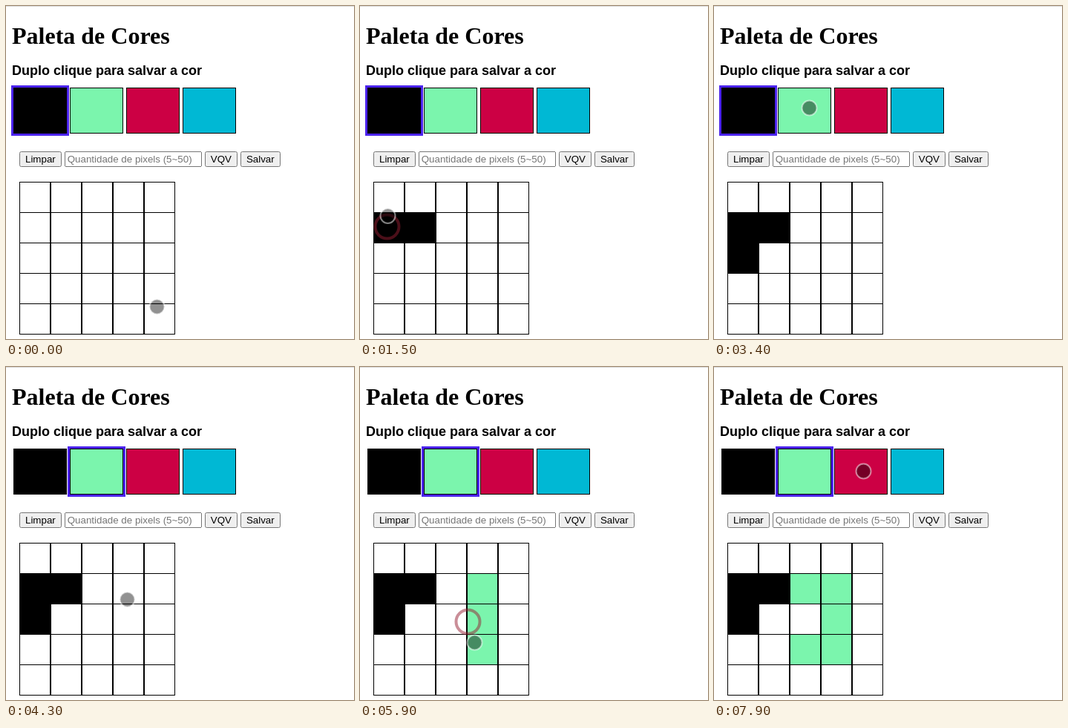
An HTML page that plays this animation: 469x449 px, repeating every 8 s.

```html
<!DOCTYPE html>
<html lang="pt">
<head>
<meta charset="utf-8">
<title>Paleta de Cores</title>
<style>
  html, body { margin: 0; width: 100%; height: 100%; overflow: hidden; background: #fff; }
  h1, h2, .controls, svg { position: absolute; margin: 0; white-space: nowrap; }
  h1 { left: 8px; top: 22px; font: bold 32px/37px "Liberation Serif", Times, serif; }
  h2 { left: 8px; top: 77px; font: bold 18px/20px "Liberation Sans", Arial, sans-serif; }
  .controls { left: 18px; top: 196px; display: flex; gap: 4px; }
  button, input { margin: 0; font: 13.333px "Liberation Sans", Arial, sans-serif; }
  input { box-sizing: border-box; width: 185px; }
  svg { left: 0; top: 0; pointer-events: none; }
</style>
</head>
<body>
<h1>Paleta de Cores</h1>
<h2>Duplo clique para salvar a cor</h2>
<div class="controls">
  <button>Limpar</button>
  <input placeholder="Quantidade de pixels (5~50)">
  <button>VQV</button>
  <button>Salvar</button>
</div>
<svg id="stage" width="469" height="449">
  <path d="M0 .5H469" stroke="#dcdcdc"/>
</svg>
<script>
const LOOP = 8000, STEP = 100, RING_LINGER = 300;
const COLORS = ['#000', '#7bf5ad', '#cc0044', '#00b8d4'];
const SWATCH = { x: 10, y: 110, width: 72, height: 62, pitch: 76 };
const GRID = { x: 18, y: 237, size: 5, cell: 42, pitchY: 41 };
const stage = document.getElementById('stage');

function set(node, attrs) {
  for (const name in attrs) node.setAttribute(name, attrs[name]);
}

function add(tag, attrs) {
  const node = document.createElementNS('http://www.w3.org/2000/svg', tag);
  set(node, attrs);
  return stage.appendChild(node);
}

// Box with a 1px border drawn inside its edges
function box(x, y, width, height, fill) {
  return add('rect', { x: x + .5, y: y + .5, width: width - 1, height: height - 1, fill, stroke: '#000' });
}

COLORS.forEach((color, i) => box(SWATCH.x + SWATCH.pitch * i, SWATCH.y, SWATCH.width, SWATCH.height, color));
const selection = add('rect', { y: 108.5, width: 75, height: 65, fill: 'none', stroke: '#4b23ee', 'stroke-width': 3 });

const cells = Array.from({ length: GRID.size ** 2 }, (_, i) => {
  const column = i % GRID.size, row = Math.floor(i / GRID.size);
  return box(GRID.x + GRID.cell * column, GRID.y + GRID.pitchY * row, GRID.cell, GRID.cell, '#fff');
});

const ring = add('circle', { r: 16, fill: 'none', stroke: 'rgba(150,30,50,.5)', 'stroke-width': 4 });
const pointer = add('circle', {
  r: 10, fill: 'rgba(0,0,0,.43)', stroke: 'rgba(255,255,255,.5)', 'stroke-width': 2, transform: 'translate(.5 .5)'
});

// Pointer stops: arrival time, x, y and, where it clicks, how long it presses
const stops = [
  [0, 203, 405], [450, 73, 104, 350], [900, 185, 11],
  [1000, 74, 305, 100], [1300, 37, 297, 100], [1600, 37, 268],
  [1950, 34, 346, 550], [3400, 128, 137, 100], [3800, 286, 290],
  [4000, 215, 436], [4300, 163, 313], [4350, 165, 331, 350],
  [4950, 160, 300, 50], [5200, 155, 380, 100], [5500, 146, 343, 200],
  [5900, 154, 371], [6200, 119, 394, 100], [6900, 128, 334],
  [7300, 121, 304, 100], [7650, 318, 225], [7900, 201, 140]
].map(([time, x, y, press = 0]) => ({ time, x, y, press, leave: time + press }));
const clicks = stops.filter(stop => stop.press);

function movePointer(time) {
  const i = stops.findLastIndex(stop => stop.time <= time);
  const from = stops[i], to = stops[i + 1] || from;
  const span = Math.max(1, to.time - from.leave);
  const p = Math.min(1, Math.max(0, (time - from.leave) / span));
  set(pointer, { cx: from.x + (to.x - from.x) * p, cy: from.y + (to.y - from.y) * p });
}

// Replays all finished clicks: a swatch picks the colour, a cell takes it
function paint(time) {
  let picked = 0;
  const fills = cells.map(() => '#fff');
  for (const { x, y, leave } of clicks) {
    if (leave > time) break;
    if (y < GRID.y) {
      picked = Math.floor((x - SWATCH.x) / SWATCH.pitch);
    } else {
      const column = Math.floor((x - GRID.x) / GRID.cell);
      const row = Math.floor((y - GRID.y) / GRID.pitchY);
      fills[row * GRID.size + column] = COLORS[picked];
    }
  }
  cells.forEach((cell, i) => set(cell, { fill: fills[i] }));
  set(selection, { x: SWATCH.x - 1.5 + SWATCH.pitch * picked });
}

function showRing(time) {
  const click = clicks.findLast(c => c.time < time && time < c.leave + RING_LINGER);
  set(ring, click ? { cx: click.x - .5, cy: click.y + .5, opacity: 1 } : { opacity: 0 });
}

const origin = performance.now();
function tick() {
  const time = Math.floor((performance.now() - origin) % LOOP / STEP) * STEP;
  paint(time);
  showRing(time);
  movePointer(time);
  requestAnimationFrame(tick);
}
tick();
</script>
</body>
</html>
```
